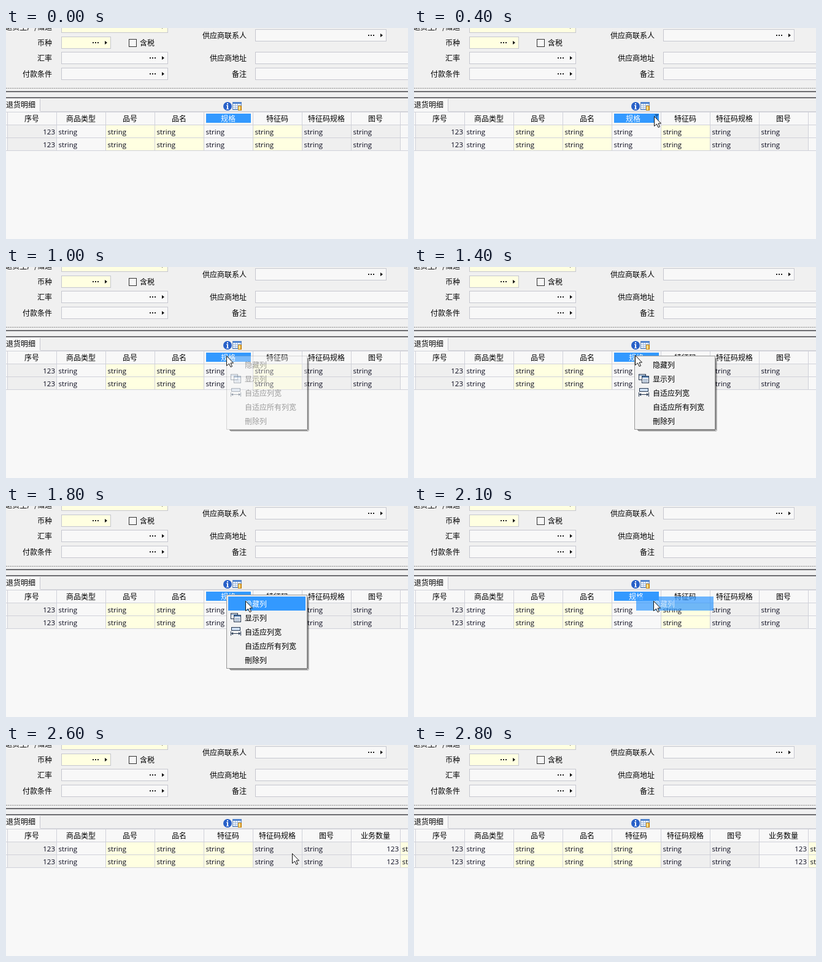
Animation of 655x345 px, one loop 3.3 s. Source, as an HTML page with a canvas:

```html
<!DOCTYPE html>
<html lang="zh">
<head>
<meta charset="utf-8">
<style>
html, body { margin: 0; height: 100%; overflow: hidden; background: #f0f0f0; }
canvas { display: block; }
</style>
</head>
<body>
<canvas id="stage" width="655" height="345"></canvas>
<script>
const c = document.getElementById('stage').getContext('2d');
const LOOP = 3300, STEP = 100;
const CJK = '12px "Noto Sans CJK SC", "Noto Sans CJK", sans-serif';
const LATIN = '11.5px "Open Sans", sans-serif';
const YELLOW = '#ffffe1', PALE = '#f8f8f8', GREY = '#efefef', BLUE = '#3399ff';
const INK = '#000', NAVY = '#23354f';

function box(x, y, w, h, fill) {
  c.fillStyle = fill;
  c.fillRect(x, y, w, h);
}
function frame(x, y, w, h, fill, line) {
  box(x + 1, y + 1, w - 2, h - 2, fill);
  c.strokeStyle = line;
  c.lineWidth = 1;
  c.strokeRect(x + 0.5, y + 0.5, w - 1, h - 1);
}
function text(s, x, y, align = 'left', color = INK, font = CJK) {
  c.font = font;
  c.textAlign = align;
  c.fillStyle = color;
  c.fillText(s, x, y);
}
function shape(points, fill, line) {
  c.beginPath();
  points.forEach(([x, y]) => c.lineTo(x, y));
  c.closePath();
  c.fillStyle = fill;
  c.fill();
  if (line) {
    c.strokeStyle = line;
    c.lineWidth = 1;
    c.stroke();
  }
}

// Form field centred on y, with its label on the left
function field(label, labelX, x, y, w, fill = PALE, picker = true) {
  text(label, labelX, y + 5, 'right');
  frame(x, y - 10, w, 20, fill, '#c6c7cf');
  if (!picker) return;
  const r = x + w;
  for (let i = 0; i < 3; i++) box(r - 30 + i * 4, y - 1, 2, 2, '#222');
  shape([[r - 10, y - 3], [r - 6, y], [r - 10, y + 3]], '#111');
}

function form() {
  box(0, 0, 655, 345, '#f0f0f0');
  field('退货生产/储运', 75, 90, -2, 174, YELLOW);
  field('币种', 75, 90, 24, 81, YELLOW);
  field('汇率', 75, 90, 49, 174);
  field('付款条件', 75, 90, 75, 174);
  field('供应商联系人', 392, 406, 12, 214);
  field('供应商地址', 392, 406, 49, 260, PALE, false);
  field('备注', 392, 406, 75, 260, PALE, false);
  frame(200, 18, 13, 13, '#f6f6f6', '#333');
  text('含税', 218, 29);

  for (let x = 0; x < 655; x += 3) box(x, 98, 2, 1, '#8c8c8c');
  box(0, 103, 655, 2, '#6c6c70');
  box(0, 113, 655, 2, '#6c6c70');
  box(0, 136, 655, 1, '#d4d5da');
  box(0, 115, 56, 22, PALE);
  box(55, 116, 1, 20, '#c6c7cf');
  text('退货明细', 0, 130);
  toolIcons();
}

function toolIcons() {
  c.beginPath();
  c.arc(361, 128, 7, 0, Math.PI * 2);
  c.fillStyle = '#2860c8';
  c.fill();
  box(360, 123, 2, 2, '#fff');
  box(360, 126, 2, 6, '#fff');
  box(359, 126, 1, 1, '#fff');
  box(359, 132, 4, 1, '#fff');

  frame(369, 121, 15, 13, '#fff', '#5b84bd');
  box(370, 121, 13, 3, '#4f83cf');
  for (let i = 0; i < 3; i++) {
    box(370, 126 + i * 3, 13, 1, '#9db8dc');
    box(373 + i * 4, 124, 1, 9, '#9db8dc');
  }
  box(378, 127, 6, 8, '#c98a1c');
  box(379, 128, 3, 6, '#ffdf83');
}

const columns = [
  ['序号', GREY, '123'], ['商品类型', PALE], ['品号', YELLOW], ['品名', YELLOW],
  ['规格', PALE], ['特征码', YELLOW], ['特征码规格', GREY], ['图号', GREY],
  ['业务数量', PALE, '123'], ['', YELLOW]
];

function grid(removed, hover) {
  const shown = columns.filter((col, i) => !removed || i !== 4);
  const line = '#d0d1d9';
  box(0, 137, 655, 208, PALE);
  shown.forEach(([name, fill, value = 'string'], i) => {
    const x = 2 + i * 80, active = i === 4, marked = active && !removed;
    box(x, 159, 80, 42, fill);
    box(x, 138, 1, 63, line);
    if (marked) box(x + 4, 140, 73, 15, BLUE);
    text(name, x + 40 - (active && hover ? 5 : 0), 153, 'center', marked ? '#fff' : INK);
    if (active && hover) {
      const ink = marked ? '#1c5fa8' : '#666';
      shape([[x + 70, 141], [x + 77, 141], [x + 74, 145], [x + 74, 148], [x + 73, 148], [x + 73, 145]], ink);
    }
    const number = value === '123';
    for (const y of [174, 195])
      text(value, x + (number ? 78 : 3.5), y, number ? 'right' : 'left', '#08081c', LATIN);
  });
  for (const y of [137, 158, 179, 200]) box(0, y, 655, 1, line);
}

const items = ['隐藏列', '显示列', '自适应列宽', '自适应所有列宽', '刪除列'];

function highlight(alpha) {
  c.globalAlpha = alpha;
  box(362, 148, 126, 23, BLUE);
  text(items[0], 389, 165, 'left', '#fff');
  c.globalAlpha = 1;
}

function menu(alpha, selected) {
  // Drop shadow stays outside the translucent panel
  for (let i = 0; i < 3; i++) {
    const shade = `rgba(0,0,0,${0.5 - i * 0.14})`;
    box(491 + i, 149 + i, 1, 117, shade);
    box(364 + i, 266 + i, 127, 1, shade);
  }
  c.globalAlpha = alpha;
  frame(359, 145, 132, 121, '#f2f2f2', '#979797');
  items.forEach((s, i) => text(s, 389, 165 + i * 23));

  frame(366, 175, 12, 10, '#fff', NAVY);
  box(367, 177, 10, 1, '#5683b8');
  frame(371, 178, 12, 12, '#fff', NAVY);
  box(372, 179, 10, 2, '#5683b8');
  for (let i = 0; i < 3; i++) box(373, 183 + i * 2, 8, 1, '#7893b5');

  frame(367, 198, 15, 6, '#cfe0f3', NAVY);
  box(366, 205, 1, 7, NAVY);
  box(382, 205, 1, 7, NAVY);
  box(368, 208, 13, 1, NAVY);
  shape([[367, 208.5], [370, 206], [370, 211]], NAVY);
  shape([[382, 208.5], [379, 206], [379, 211]], NAVY);
  c.globalAlpha = 1;
  if (selected) highlight(1);
}

function pointer([x, y]) {
  const arrow = [[0, 0], [0, 16], [4, 12.5], [6.5, 18], [9, 17], [6.5, 11.5], [11, 11.5]];
  shape(arrow.map(([dx, dy]) => [x + dx + 0.5, y + dy + 0.5]), '#fff', '#111');
}

// Pointer positions, one per step from the given start
const moves = [
  [1, [[553, 58], [487, 102], [431, 131], [391, 144], [374, 150], [365, 150], [361, 147], [359, 145]]],
  [14, [[360, 144], [368, 149], [377, 153], [385, 155], [390, 155]]],
  [26, [[466, 177], [592, 197]]]
];

function pointerAt(step) {
  if (step < 1 || step >= 28) return null;
  const [start, path] = moves.filter(m => m[0] <= step).pop();
  return path[Math.min(step - start, path.length - 1)];
}

function draw(now) {
  const step = Math.floor(now % LOOP / STEP);
  const removed = step >= 22;
  const hover = step >= 4 && step < 10 || step >= 22 && step < 26;
  form();
  grid(removed, hover);
  if (step >= 10 && step < 21) menu(Math.min(1, 0.36 + (step - 10) * 0.35), step >= 15);
  if (step === 21) highlight(0.7);
  if (step === 22) highlight(0.36);
  const p = pointerAt(step);
  if (p) pointer(p);
}

let began;
function tick(now) {
  began ??= now;
  draw(now - began);
  requestAnimationFrame(tick);
}
draw(0);
requestAnimationFrame(tick);
</script>
</body>
</html>
```
